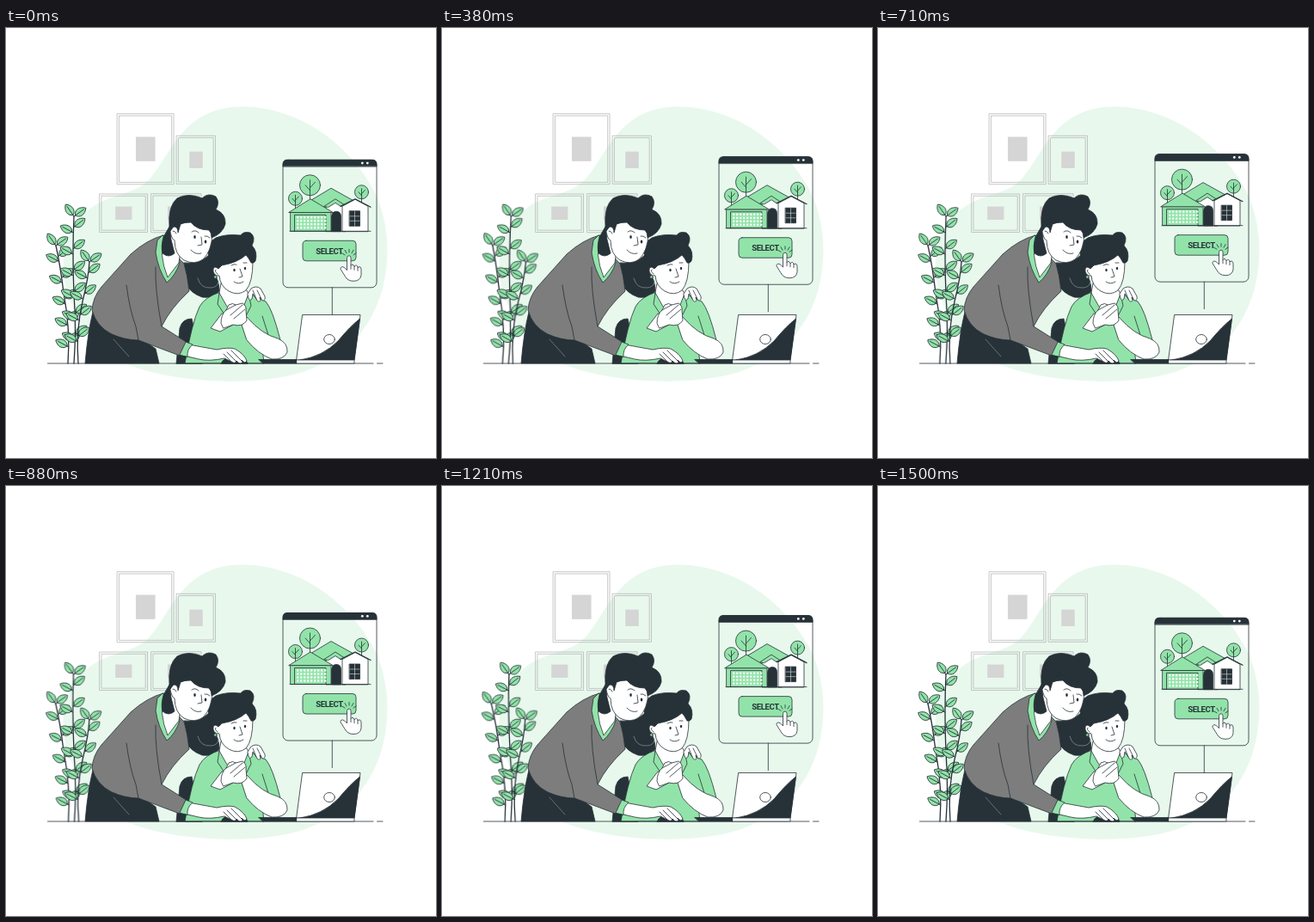
These frames come from a looping animation (500x500 px, 1.54 s). An HTML page:

```html
<!DOCTYPE html>
<html lang="en">
<head>
<meta charset="utf-8">
<title>Choosing a house</title>
<style>
html, body { margin: 0; width: 100%; height: 100%; overflow: hidden; background: #fff; }
svg { display: block; width: 100vw; height: 100vh; stroke-linecap: round; stroke-linejoin: round; }
.ink { stroke: #263238; stroke-width: .8; }
.line { fill: none; }
.dark { fill: #263238; }
.green { fill: #92e3a9; }
.white { fill: #fff; }
.grey { fill: #7d7d7d; }
.none { stroke: none; }
.frames { fill: none; stroke: #b0b0b0; stroke-width: .7; }
.frames .art { fill: #d5d5d5; stroke: none; }
.stem { fill: none; stroke-width: 1.3; }
#plant { transform-origin: 78px 298px; }
text { font: 600 9.6px Roboto, sans-serif; font-stretch: 75%; letter-spacing: -.4px; fill: #263238; stroke: none; }
</style>
</head>
<body>
<svg viewBox="0 0 500 500">
  <path fill="#e8f8ed" d="M275 91.500C344 92 399 138 425 184C444 217 447 260 440 293C430 346 395 383 345 400C297 415 222 414 165 399C115 386 86 355 72 309C58 266 71 221 111 202C130 193 146 192 160 182C190 159 199 91 275 91.500Z"/>

  <g class="frames" id="frames"></g>
  <g class="ink" id="plant"></g>

  <!-- chair -->
  <path class="ink dark" d="M198 390L202 349Q205 338 216 338L228 390Z"/>

  <!-- woman -->
  <g class="ink">
    <path class="dark" d="M207 273Q225 275 236 264L241 284Q248 293 248 306Q239 315 228 313Q214 308 210 298Z"/>
    <path class="line" style="stroke:#7c898d" d="M223 291Q226 303 238 302Q246 302 247 295"/>
    <path class="green" d="M249 307Q231 313 225 324Q216 343 208 390H300L298 372L319 363Q310 327 302 318L281 308Z"/>
    <path class="white" d="M250 297L248 308L257 324L266 330L277 322L282 309L277 300Z"/>
    <path class="white" d="M248 276Q243 273 241 279Q240 288 248 288Q249 300 259 306Q270 312 279 305Q287 296 287 271L279 263L255 269Z"/>
    <path class="dark" d="M236 266Q231 251 244 244Q256 239 273 241Q276 236 284 238Q291 243 286 253Q293 260 290 271Q288 274 285 273Q282 267 279 264Q269 273 251 276L247 280Q240 274 240 286L237 276Z"/>
    <path class="line" d="M262 276Q265 274 268 275M276 273L280 273M272 280L275 289L271 290M265 295Q270 299 276 295M244 281Q242 283 246 286"/>
    <ellipse class="dark none" cx="265.500" cy="281.500" rx="1.200" ry="1.800"/>
    <ellipse class="dark none" cx="278" cy="279.500" rx="1.200" ry="1.800"/>
    <circle class="green" cx="243.500" cy="289.500" r="1.700"/>
    <path class="line" d="M248 308L246 321L256 336M282 309L285 323L279 335M298 335L305 357"/>
    <!-- forearms and joined hands -->
    <path class="white" d="M273 341L280 336Q297 356 316 361Q328 366 327 377Q323 386 309 385Q293 379 280 363Z"/>
    <path class="white" d="M251 332L238 349L249 353L264 345Z"/>
    <path class="white" d="M250 343Q250 333 256 328L259 322Q264 319 267 322L275 320Q280 323 279 329L280 340Q275 348 264 345L253 349Z"/>
    <path class="line" d="M256 328L267 322M261 334L275 322M265 338L278 327"/>
    <!-- hand on the shoulder -->
    <path class="white" d="M281 309L285 303Q291 299 296 303L301 312Q302 317 298 317L295 313L296 317Q293 320 291 315L287 309L286 315Q283 318 282 314Z"/>
    <path class="line" d="M287 305L291 315M292 305L297 315"/>
  </g>

  <!-- man -->
  <g class="ink">
    <path class="dark" d="M101 330Q95 354 92 390H178L174 373L157 361Z"/>
    <path class="line" style="stroke:#8f999c;stroke-width:.6" d="M125 362L143 382"/>
    <path class="grey" d="M183 241Q164 246 145 263L111 301Q101 313 100 328Q105 347 123 356Q139 363 154 363L202 381L211 366L181 347Q192 325 213 306Q211 287 207 274L203 270Z"/>
    <path class="line" d="M140 299Q144 329 151 347L154 363M174 278Q173 305 181 347"/>
    <path class="green" d="M182 241L176 247L174 261Q177 281 187 296Q197 288 202 273Z"/>
    <path class="white" d="M184 242Q177 263 188 290L201 273L203 258L194 236Z"/>
    <path class="dark" d="M190 231L183 243Q180 254 182 262Q189 268 196 262L192 246Z"/>
    <path class="white" d="M201 228Q191 226 191 237Q193 246 196 247Q196 263 207 270Q219 276 229 269Q239 260 240 239L223 222Z"/>
    <path class="dark" d="M190 231Q188 207 199 198Q212 191 228 198Q235 191 244 196Q249 203 244 211Q256 216 255 228Q252 239 239 244Q239 238 236 235Q222 235 215 226Q207 226 203 228L200 238Q200 231 195 231L191 236Z"/>
    <path class="line" d="M216 237Q220 234 224 238M231 242Q234 241 237 244M227 243L228 252L223 253M215 258Q220 264 227 262M194 236Q196 235 198 239"/>
    <ellipse class="dark none" cx="219.500" cy="243" rx="1.300" ry="1.900"/>
    <ellipse class="dark none" cx="232" cy="248.500" rx="1.300" ry="1.900"/>
    <path class="dark" d="M250 390Q254 382 265 382Q278 380 281 390Z"/>
    <path class="white" d="M204 380L212 368L245 374Q258 371 266 373Q277 379 280 387Q278 391 274 386L275 389Q272 392 268 387Q267 391 262 388L254 384Q236 388 224 385Z"/>
    <path class="line" d="M262 375L274 387M257 377L268 388M253 379L262 388"/>
    <path class="green" d="M202 380L209 365L217 368Q210 374 211 382Z"/>
  </g>

  <!-- desk -->
  <g class="ink">
    <path class="dark" d="M294 385.500H338V390H299Z"/>
    <path class="line" d="M48.500 390H427M431.500 390H438"/>
    <path class="white" d="M345 333.500H412L405 386H338Z"/>
    <path class="dark" d="M342 386Q368 382 386 364Q400 347 411.500 338L405 386Z"/>
    <path class="white" d="M338 386H405V390H338Z"/>
    <ellipse class="white" cx="376" cy="362" rx="6.300" ry="5.500"/>
  </g>

  <!-- floating window -->
  <g id="panel" class="ink">
    <path class="line" d="M379.300 301.500V333"/>
    <rect class="line" x="322" y="153" width="109" height="148.500" rx="6"/>
    <path class="dark" d="M322 160.500V158Q322 153 327 153H426Q431 153 431 158V160.500Z"/>
    <circle class="white none" cx="414.300" cy="156.800" r="1.400"/>
    <circle class="white none" cx="420.300" cy="156.800" r="1.400"/>

    <g id="trees"></g>
    <path class="green" d="M353 201L378 186L405 201L400 213H356Z"/>
    <path class="white" d="M372 236V207L383 200L395 207V236Z"/>
    <path class="green" d="M370 207L383 198.500L396 207H389L383 203L375 208Z"/>
    <path class="green" d="M331 214H378V236H331Z"/>
    <path class="green" d="M329 214L354 198.500L380 214Z"/>
    <path class="line" d="M335.500 236V217H372V236"/>
    <path class="line" id="lattice" style="stroke:#effcf3;stroke-width:2.400;stroke-linecap:butt"/>
    <path class="dark" d="M378.500 236V219Q379 213 384 213Q389.500 213 389.500 219V236Z"/>
    <path class="white" d="M391 236V207L406 199L421 207V236Z"/>
    <path class="line" style="stroke-width:1.200" d="M389 207L406 198.500L424 208"/>
    <path class="dark" d="M399.500 212.500H411.500V230H399.500Z"/>
    <path class="line" style="stroke:#fff;stroke-width:.5" d="M405.500 213V230M400 218.500H411M400 224H411"/>
    <path class="line" d="M330 236H424"/>

    <rect class="green" x="345" y="247" width="62" height="23.500" rx="4"/>
    <text x="376" y="262.700" text-anchor="middle">SELECT</text>
    <path class="line" d="M399 257V260.500M394 258L396 261.500M404 258L402 261.500M390.500 261.500L394 263.500M407 261.500L404 263.500"/>
    <path class="white" d="M396.500 281V267Q396.500 264.500 399 264.500Q401 264.500 401 267V276Q403 273 405 277Q408 274 409 278Q413 276 413 281V287Q412 294 404 294Q397 294 394 288L389 280Q389 276 393 278Z"/>
    <path class="line" d="M401 276V280M405 277V281M409 278V282"/>
  </g>
</svg>
<script>
const $ = id => document.getElementById(id);
const rect = (x, y, w, h, c = "") => `<rect x="${x}" y="${y}" width="${w}" height="${h}" class="${c}"/>`;

// double border with a centred block
const frame = (x, y, w, h, rim = 2.3, art = .345) =>
  rect(x, y, w, h) + rect(x + rim, y + rim, w - 2 * rim, h - 2 * rim) +
  rect(x + w * (1 - art) / 2, y + h * (1 - art) / 2, w * art, h * art, "art");
$("frames").innerHTML = frame(129.5, 99.7, 65.5, 82) + frame(198.5, 125.3, 45, 56) +
  frame(109, 193, 55.500, 44.5) + frame(169, 192.7, 58, 45);

const tree = (x, y, r) => `<g transform="translate(${x} ${y})"><circle class="green" r="${r}"/>
  <path class="line" d="M0 ${-r / 2}V${r * 1.5}M0 ${r / 2}L${-r * .45} 0M0 ${r / 4}L${r * .5} ${-r * .3}"/></g>`;
$("trees").innerHTML = tree(353.5, 182.5, 12) + tree(336.5, 198, 8) + tree(413.5, 190.5, 8);

let cells = "";
for (let y = 220; y < 236; y += 4)
  for (let x = 338; x < 371; x += 4) cells += `M${x} ${y}h2.4`;
$("lattice").setAttribute("d", cells);

// each stem runs from its tip down and carries leaves on both sides at a steady pitch
const PITCH = 25;
const leaf = ({ x, y }, a) => `<g transform="translate(${x} ${y}) rotate(${a})">
  <path class="green" d="M2 0C4 -6 12 -6 17 0C12 6 4 6 2 0Z"/><path class="line" d="M0 0H14"/></g>`;

function stem(d, pairs) {
  const path = document.createElementNS("http://www.w3.org/2000/svg", "path");
  path.setAttribute("d", d);
  const at = s => path.getPointAtLength(Math.max(0, s));
  let out = `<path class="stem" d="${d}"/>`;
  for (let k = 0; k < pairs; k++) {
    out += leaf(at(k * PITCH - 6), k ? -152 : -125);
    out += leaf(at(k * PITCH - 12), k ? -38 : -35);
  }
  return out;
}
$("plant").innerHTML =
  stem("M58 253Q63 275 67 308Q75 350 72 390", 6) +
  stem("M79 219Q77 260 79 310Q82 350 79 390", 7) +
  stem("M97 272Q96 290 89 318Q81 352 84 390", 5);

// 1.5 s of motion, then one short hold
const MOVE = 1500, LOOP = 1540;
const play = (id, steps) => $(id).animate(
  [...steps, [1, steps[0][1]]].map(([p, transform]) => ({ offset: p * MOVE / LOOP, transform }))
    .concat({ offset: 1, transform: steps[0][1] }),
  { duration: LOOP, iterations: Infinity });

const shift = y => `translateY(${y}px)`, turn = a => `rotate(${a}deg)`;
play("panel", [[0, shift(.3)], [.5, shift(-6.7)]]);
play("plant", [[0, turn(0)], [.25, turn(1)], [.75, turn(-1)]]);
</script>
</body>
</html>
```
